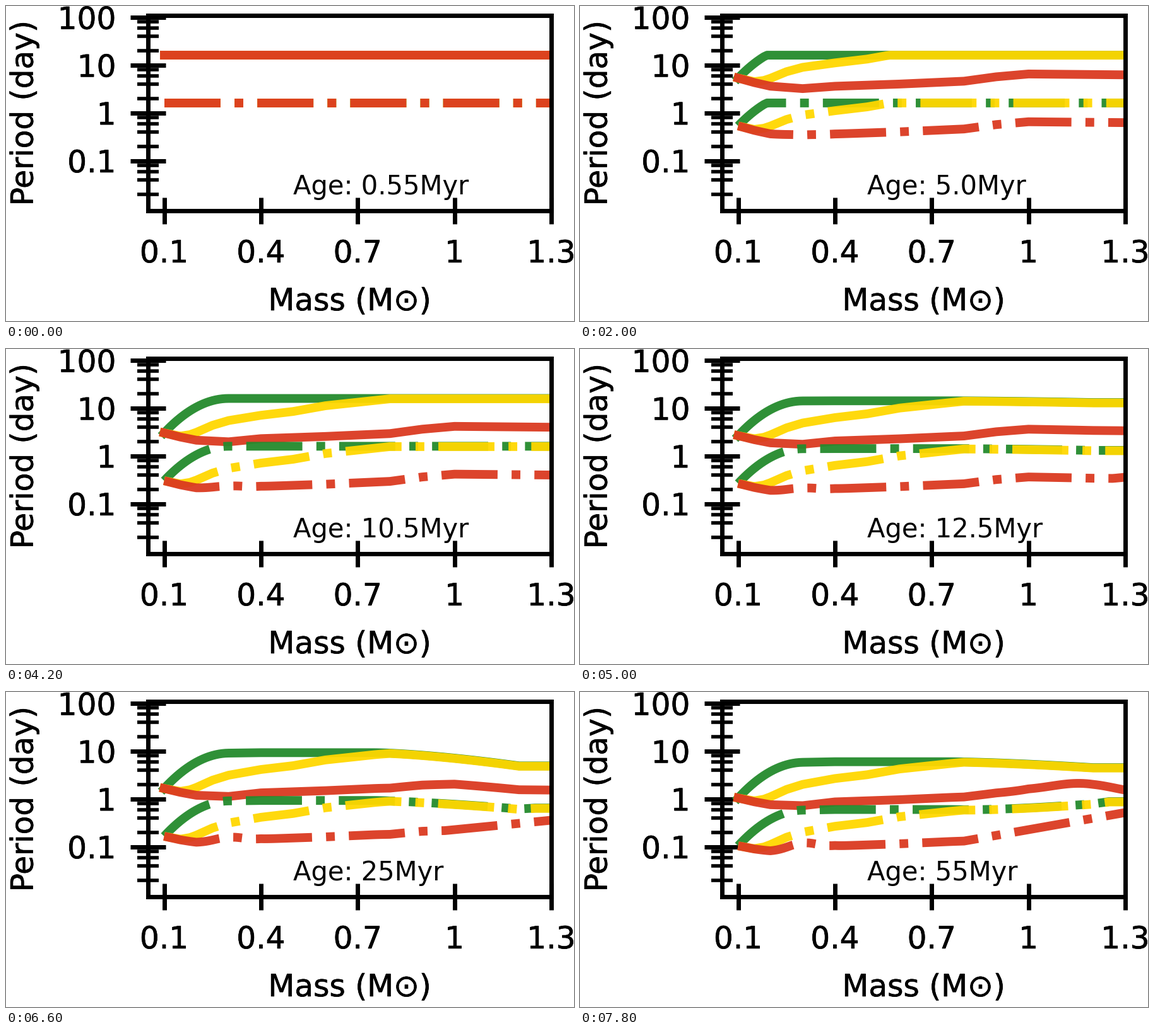
A matplotlib script that plays this animation: 900 by 500 pixels, repeating every 8000 ms.

```python
import numpy as np
import matplotlib.pyplot as plt
from matplotlib import patheffects
from matplotlib.animation import FuncAnimation

plt.rcParams["font.family"] = "DejaVu Sans"

W, H, DPI = 900, 500, 100
GREEN, YELLOW, RED = "#248a2c", "gold", "#db3a20"
LOCK = 1.21              # log10 of the disk-locked period in days

mass = np.linspace(0.1, 1.3, 121)

# Spin-up (dex) of the lightest star against age (Myr).
AGES = [0.55, 3, 7, 10.5, 14.5, 25, 55]
SPIN = [0, 0.293, 0.603, 0.728, 0.833, 0.99, 1.19]

# Spin-up against mass, relative to the lightest star.
RED_SHAPE = np.interp(
    mass, [0.1, 0.15, 0.2, 0.3, 0.4, 0.6, 0.8, 0.9, 1, 1.3],
    [0, 0.085, 0.152, 0.185, 0.119, 0.073, 0.013, -0.079, -0.138, -0.12])
YELLOW_SHAPE = np.interp(
    mass, [0.1, 0.15, 0.18, 0.2, 0.25, 0.3, 0.4, 0.5, 0.6, 0.8],
    [0, 0.066, 0.035, -0.013, -0.16, -0.26, -0.37, -0.45, -0.57, -0.715])


def ramp(start, end, power=1):
    return np.clip((mass - start) / (end - start), 0, 1) ** power


def bell(center, width):
    return np.exp(-((mass - center) / width) ** 2)


def past(age, start):
    return max(0, np.log10(age / start))


GREEN_SHAPE = -0.722 * (1 - (1 - ramp(0.1, 0.3)) ** 2)


def periods(age):
    """Solid, then dashed periods for green, yellow and red."""
    base = np.interp(np.log(age), np.log(AGES), SPIN)
    grown = min(1, past(age, 0.55) / past(3, 0.55))
    young = 0.047 * (10.5 / max(age, 3) - 1) * ramp(0.1, 0.4)
    # Heavy stars contract faster on their way to the main sequence.
    late = np.interp(np.log(age), np.log(AGES[3:]), [0, 0.25, 1, 0.45])
    heavy = 0.277 * late * ramp(0.75, 1.2, 1.5)
    wind = 0.62 * past(age, 25) * bell(1.17, 0.14)

    shapes = (GREEN_SHAPE + heavy, YELLOW_SHAPE + heavy,
              RED_SHAPE + 0.65 * heavy - wind)
    solid = [LOCK - np.maximum(0, base + grown * (s + young)) for s in shapes]

    slow = 0.5 * past(age, 14.5) * ramp(0.8, 1.25, 1.5)
    drag = (0.13 * past(age, 3) * bell(0.3, 0.06)
            + 0.13 * past(age, 14) * ramp(0.1, 0.4))
    floor = -0.642 + (0.66 + 1.56 * past(age, 25)) * (mass - 1)
    green, yellow, red = (s - 1 for s in solid)
    dashed = [green + slow, yellow + slow, np.maximum(red + drag, floor)]
    return [10 ** p for p in solid + dashed]


fig = plt.figure(figsize=(W / DPI, H / DPI), dpi=DPI, facecolor="white")
ax = fig.add_axes([0.25, 0.35, 0.71, 0.62])
ax.set_yscale("log")
ax.set_xlim(0.05, 1.3)
ax.set_ylim(0.009, 110)

masses, decades = [0.1, 0.4, 0.7, 1, 1.3], [0.1, 1, 10, 100]
ax.set_xticks(masses)
ax.set_yticks(decades)
ax.set_yticks([d * s for d in decades for s in (0.2, 0.4, 0.6, 0.8)],
              minor=True)
ax.tick_params(which="both", direction="inout", width=5,
               labelleft=False, labelbottom=False)
ax.tick_params(axis="x", length=30)
ax.tick_params(axis="y", length=40)
ax.tick_params(axis="y", which="minor", length=25, width=4)
for spine in ax.spines.values():
    spine.set_linewidth(5)


def label(x, y, text, ha="center", **kw):
    """Heavy text with its baseline at pixel (x, y) from the top left."""
    effect = [patheffects.withStroke(linewidth=0.45, foreground="black")]
    fig.text(x / W, 1 - y / H, text, size=35, ha=ha, va="baseline",
             path_effects=effect, **kw)


for m in masses:
    label(ax.transData.transform((m, 1))[0], 407, f"{m:g}")
for d in decades:
    label(174.5, H - ax.transData.transform((1, d))[1] + 18.3, f"{d:g}",
          ha="right")
label(544.5, 483, "Mass (M\u2299)")
label(42.5, 170.5, "Period (day)", rotation=90, rotation_mode="anchor")
age_text = ax.text(0.5, 0.02, "", size=30, va="baseline")

lines = [ax.plot(mass, mass, style, color=color, lw=10, alpha=0.95)[0]
         for style in ("-", "-.") for color in (GREEN, YELLOW, RED)]


def update(n):
    step = max(0, n - 1)
    if step < 30:
        age = max(0.55, 0.5 + 0.5 * step)
    else:
        age = 15 + 5 * (step - 30)
    for line, period in zip(lines, periods(age)):
        line.set_ydata(period)
    age_text.set_text(f"Age: {age}Myr")
    return lines + [age_text]


anim = FuncAnimation(fig, update, frames=40, interval=200, repeat=True,
                     repeat_delay=0, blit=False)
plt.show()
```
